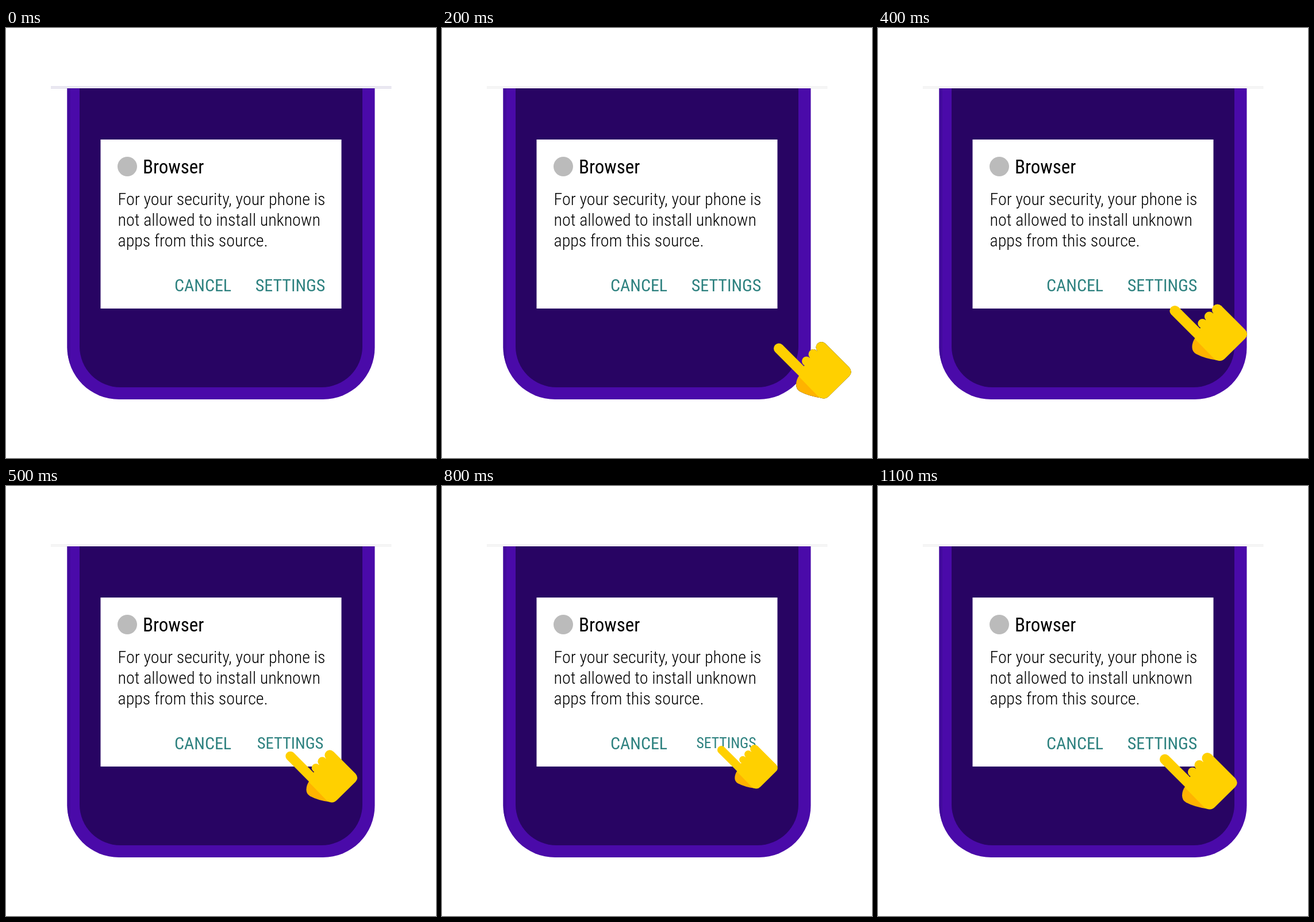
Animation, 748 px wide and 748 px high, one loop 1400 ms. Source, as an HTML page:

```html
<!DOCTYPE html>
<html lang="en">
<head>
<meta charset="utf-8">
<title>Install prompt</title>
<style>
  html, body { margin: 0; width: 100%; height: 100%; overflow: hidden; background: #fff; }
  svg { display: block; width: 100vw; height: 100vh; }
  text { font-family: "Roboto Condensed", Roboto, sans-serif; font-stretch: 75%; font-size: 30px; }
  .body { font-weight: 300; }
  .button { fill: #2d817f; }
</style>
</head>
<body>
<svg viewBox="0 0 748 748">
  <defs>
    <g id="palm">
      <path d="M516 490L562 536" stroke="currentColor" stroke-width="18" stroke-linecap="round"/>
      <circle cx="590" cy="488" r="9.5"/>
      <circle cx="576" cy="500" r="8.5"/>
      <circle cx="564" cy="512" r="8"/>
      <path d="M551 539L564 512L576 500L590 488L597 481.5L638.5 523Q645 531 638.5 538L603 573Q597 579 589 576L586 575Z"/>
    </g>
    <path id="thumb" d="M552 536Q546 544 546 553Q546 561 553 565Q568 573 590 576Z"/>
  </defs>

  <!-- Dark copy behind the phone: the fading hand darkens outside it -->
  <g id="shade" fill="#000" color="#000"><use href="#thumb"/><use href="#palm"/></g>

  <path d="M106.500 105H641.500V556A90 90 0 0 1 551.500 646H196.500A90 90 0 0 1 106.500 556Z" fill="#4a0aa9"/>
  <path d="M106.500 105H112V585Q106.500 570 106.500 556Z" fill="#420a9c"/>
  <path d="M128 105H620V554A71 71 0 0 1 549 625H199A71 71 0 0 1 128 554Z" fill="#280463"/>
  <path id="edge" d="M78 102H670.500M78 104.500H670.500" stroke-width="1"/>

  <rect x="164.500" y="194" width="419" height="294" fill="#fff"/>
  <circle cx="211" cy="241" r="17" fill="#bbb"/>
  <text x="238" y="252.500" style="font-size:33px">Browser</text>
  <g class="body">
    <text x="194.500" y="308">For your security, your phone is</text>
    <text x="194.500" y="344">not allowed to install unknown</text>
    <text x="194.500" y="380">apps from this source.</text>
  </g>
  <text class="button" x="293" y="458">CANCEL</text>
  <g id="settings"><text class="button" text-anchor="middle" y="10.700">SETTINGS</text></g>

  <g id="hand">
    <use href="#thumb" fill="#ffb300"/>
    <use href="#palm" fill="#ffd000" color="#ffd000"/>
  </g>
</svg>
<script>
  const LOOP = 1400, STEP = 100, LAST_STEP = 11;
  const [shade, hand, settings, edge] =
    ["shade", "hand", "settings", "edge"].map(id => document.getElementById(id));

  const clamp = v => Math.min(1, Math.max(0, v));
  const ramp = (t, from, to) => clamp((t - from) / (to - from));
  const mix = (a, b, p) => a + (b - a) * p;

  function render(time) {
    const t = Math.min(Math.floor((time % LOOP) / STEP), LAST_STEP) * STEP;
    const travel = ramp(t, 200, 450);
    const press = ramp(t, 450, 600) - ramp(t, 800, 1100);
    const x = mix(644.5, 557.5, travel) - 26 * press;
    const y = mix(595.5, 513.5, travel) - 25 * press;
    const scale = mix(1, 0.778, press);
    const pose = `translate(${x} ${y}) scale(${scale}) translate(-574.5 -528)`;

    for (const layer of [shade, hand]) {
      layer.setAttribute("transform", pose);
      layer.style.display = t ? "" : "none";
    }
    hand.style.opacity = t < 200 ? 0.53 : 1;
    settings.setAttribute("transform", `translate(494.5 447.3) scale(${mix(1, 0.855, press)})`);
    edge.setAttribute("stroke", t ? "#e6e6e6" : "#c9c5dc");
  }

  const start = performance.now();
  function tick() {
    render(performance.now() - start);
    requestAnimationFrame(tick);
  }
  tick();
</script>
</body>
</html>
```
